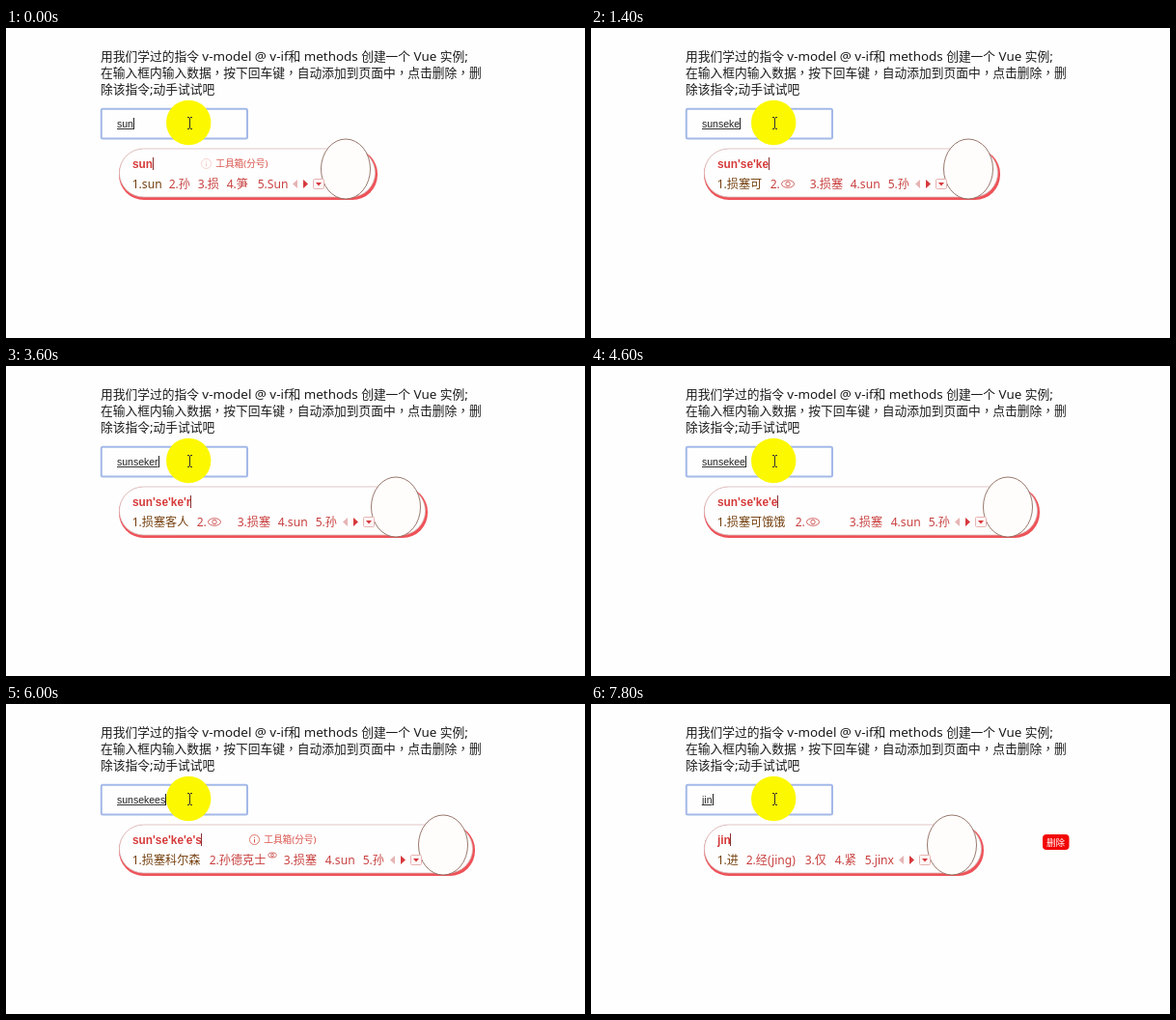
These frames come from a looping animation (600x321 px, 8000 ms). An HTML page with a canvas:

```html
<!DOCTYPE html>
<html lang="zh-CN">
<head>
<meta charset="utf-8">
<title>Vue 练习</title>
<style>
  html, body { margin: 0; width: 100%; height: 100%; overflow: hidden; background: #fefefe; }
  canvas { display: block; width: 600px; height: 321px; }
</style>
</head>
<body>
<canvas id="stage"></canvas>
<script>
const W = 600, H = 321, LOOP = 8000;
const SANS = '"Noto Sans", "Noto Sans CJK SC", sans-serif';
const CJK = '"Noto Sans CJK SC", sans-serif';
const CENTRED = '"Noto Sans CJK TC", sans-serif';
const ARIAL = '"Liberation Sans", Arial, sans-serif';
const RED = '#c8403f', BROWN = '#75400f', PINK = '#e6b4b4';

const canvas = document.getElementById('stage');
const ctx = canvas.getContext('2d');
const dpr = window.devicePixelRatio || 1;
canvas.width = W * dpr;
canvas.height = H * dpr;

// Candidate lists: words, their left edges and the right edge of the panel.
const lists = {
  sun: { words: ['sun', '孙', '损', '笋', 'Sun'], xs: [131, 169, 199, 229, 261], right: 385 },
  s: { words: ['孙氏', '损失', '损伤', 'sun', '孙'], xs: [131, 174, 217, 260, 299], right: 416 },
  se: { words: ['损塞尔', '孙色', '损色额', 'sun', '孙'], xs: [131, 186, 228, 283, 322], right: 439 },
  ke: { words: ['损塞可', '', '损塞', 'sun', '孙'], xs: [131, 186, 227, 269, 308], right: 424 },
  ker: { words: ['损塞客人', '', '损塞', 'sun', '孙'], xs: [131, 198, 240, 282, 321], right: 437 },
  kers: { words: ['孙的可认识', '损塞克瑞斯', '损塞', 'sun', '孙'], xs: [131, 220, 300, 342, 381], right: 497, check: 207 },
  kee: { words: ['损塞可饿饿', '', '损塞', 'sun', '孙'], xs: [131, 212, 268, 311, 350], right: 465 },
  kees: { words: ['损塞科尔森', '', '损塞', 'sun', '孙'], xs: [131, 212, 263, 306, 345], right: 460, pale: true },
  cloud: { words: ['损塞科尔森', '孙德克士', '损塞', 'sun', '孙'], xs: [131, 211, 288, 331, 370], right: 486, badge: 276 },
  jin: { words: ['进', '经(jing)', '仅', '紧', 'jinx'], xs: [131, 161, 222, 253, 284], right: 407 }
};

// start, spelling, list, opacity of the tip icon (0 hides the tip)
const steps = [
  [0, 'sun', 'sun', 0.3],
  [200, 'sun', 'sun', 1],
  [400, "sun's", 's', 0],
  [800, "sun'se", 'se', 0],
  [1200, "sun'se'k", 'ke', 0],
  [1400, "sun'se'ke", 'ke', 0],
  [1800, "sun'se'ke'r", 'ker', 0],
  [2200, "sun'se'ke'r's", 'kers', 0],
  [3400, "sun'se'ke'r", 'ker', 0],
  [4000, "sun'se'ke", 'ke', 0],
  [4400, "sun'se'ke'e", 'kee', 0],
  [5000, "sun'se'ke'e's", 'kees', 0],
  [5400, "sun'se'ke'e's", 'cloud', 0],
  [5800, "sun'se'ke'e's", 'cloud', 1],
  [6200, 'sunsekees', null, 0],
  [6600, '', null, 0],
  [7200, 'jin', null, 0],
  [7600, 'jin', 'jin', 0]
];

function text(str, x, y, font, color) {
  ctx.font = font;
  ctx.fillStyle = color;
  ctx.fillText(str, x, y);
  return ctx.measureText(str).width;
}

// Latin runs get their own size, Chinese commas sit centred in their cell.
function mixed(str, x, y, size, latin, color) {
  for (const run of str.match(/[ -~]+|，|[^ -~，]+/g)) {
    let font = `${size}px ${run === '，' ? CENTRED : CJK}`;
    if (run.charCodeAt(0) < 127) font = `${latin}px ${SANS}`;
    x += text(run, x, y, font, color);
  }
}

function rect(x, y, w, h, color) {
  ctx.fillStyle = color;
  ctx.fillRect(x, y, w, h);
}

function pill(x, y, w, h, r) {
  ctx.beginPath();
  ctx.roundRect(x, y, w, h, r);
}

function oval(x, y, rx, ry = rx) {
  ctx.beginPath();
  ctx.ellipse(x, y, rx, ry, 0, 0, Math.PI * 2);
}

function line(color, width = 1) {
  ctx.strokeStyle = color;
  ctx.lineWidth = width;
  ctx.stroke();
}

function fill(color) {
  ctx.fillStyle = color;
  ctx.fill();
}

function poly(color, ...pts) {
  ctx.beginPath();
  for (let i = 0; i < pts.length; i += 2) ctx.lineTo(pts[i], pts[i + 1]);
  fill(color);
}

function cloudIcon(x, y, s) {
  oval(x, y, 6.5 * s, 3.8 * s);
  line(RED, 0.8);
  oval(x, y, 2.2 * s);
  line(RED, 0.8);
}

function checkIcon(x, y) {
  oval(x, y, 4);
  line(BROWN, 0.8);
  ctx.beginPath();
  ctx.moveTo(x - 2, y);
  ctx.lineTo(x - 0.3, y + 1.6);
  ctx.lineTo(x + 3, y - 2.4);
  line(BROWN, 0.9);
}

function drawPage() {
  rect(0, 0, W, H, '#fefefe');
  [
    '用我们学过的指令 v-model @ v-if和 methods 创建一个 Vue 实例;',
    '在输入框内输入数据，按下回车键，自动添加到页面中，点击删除，删',
    '除该指令;动手试试吧'
  ].forEach((s, i) => mixed(s, 98, 34 + i * 16.8, 12.74, 13.4, '#1c1c1c'));
  pill(98.8, 83.8, 151.2, 30.6, 1.5);
  line('#a3b9e8', 2);
}

function drawInput(typed, composing) {
  oval(189.2, 98, 23.2);
  fill('#fcf800');
  const w = text(typed, 115, 102.5, `10.5px ${ARIAL}`, '#222');
  if (composing) rect(115, 104, w, 1, '#333');
  rect(Math.round(115 + w), 93, 1, 12, '#222');

  rect(190, 93, 1, 11, '#333');
  rect(188, 92, 2, 1, '#333');
  rect(191, 92, 2, 1, '#333');
  rect(188, 104, 2, 1, '#333');
  rect(191, 104, 2, 1, '#333');
}

function drawItem() {
  text('sunsekees', 118, 147, `13px ${SANS}`, '#1c1c1c');
  pill(468, 135, 27.5, 16, 4);
  fill('#f20505');
  text('删除', 472, 146.6, `9.6px ${CJK}`, '#fff');
}

function drawTip(x, alpha) {
  ctx.globalAlpha = alpha;
  oval(x, 140.5, 5);
  line('#dd6a5c', 0.9);
  rect(x - 0.5, 138, 1, 1, '#dd5a50');
  rect(x - 0.5, 140, 1, 3.5, '#dd5a50');
  ctx.globalAlpha = 1;
  mixed('工具箱(分号)', x + 9.7, 144, 9.7, 9.7, '#d9534c');
}

function drawPager(right) {
  const a = right - 85;
  poly(PINK, a + 2, 157, a + 2, 166, a - 3, 161.5);
  poly('#d6383c', a + 8, 157, a + 8, 166, a + 13, 161.5);
  pill(a + 18.5, 156.5, 11, 10, 1);
  fill('#fff6f6');
  line(PINK);
  poly('#d6383c', a + 21, 160, a + 27, 160, a + 24, 163.5);
}

function drawPanel(spelling, list, tip) {
  const { words, xs, right, check, badge, pale } = list;
  const w = right - 117;
  pill(117, 125, w, 53, 26);
  fill('#ee5258');
  pill(117.5, 125, w - 3, 50, 25);
  fill('#fefefe');
  line('#d9b9b9', 0.8);

  const sw = text(spelling, 131, 144.5, `bold 11.85px ${ARIAL}`, '#d63a3a');
  const caret = Math.floor(131 + sw);
  rect(caret, 134, 1, 13, '#8a3030');
  if (tip) drawTip(caret + 55.5, tip);

  words.forEach((word, i) => {
    const waiting = !word;
    ctx.globalAlpha = waiting && pale ? 0.45 : 1;
    mixed(`${i + 1}.${word}`, xs[i] - 0.3, 166, 12.1, 12.1, i ? RED : BROWN);
    if (waiting) cloudIcon(xs[i] + 18, 161.5, 1);
    ctx.globalAlpha = 1;
  });
  if (check) checkIcon(check, 158);
  if (badge) cloudIcon(badge, 156.5, 0.65);

  oval(right - 33, 146, 25.5, 31);
  fill('#fffdfc');
  line('#8d6a5e', 0.9);
  drawPager(right);
}

function draw(t) {
  const [, spelling, key, tip] = steps.findLast(s => s[0] <= t);
  ctx.setTransform(dpr, 0, 0, dpr, 0, 0);
  drawPage();
  drawInput(spelling.replaceAll("'", ''), t < 6200 || t >= 7200);
  if (t >= 6600) drawItem();
  if (key) drawPanel(spelling, lists[key], tip);
}

const start = performance.now();
function frame() {
  draw((performance.now() - start) % LOOP);
  requestAnimationFrame(frame);
}
frame();
</script>
</body>
</html>
```
